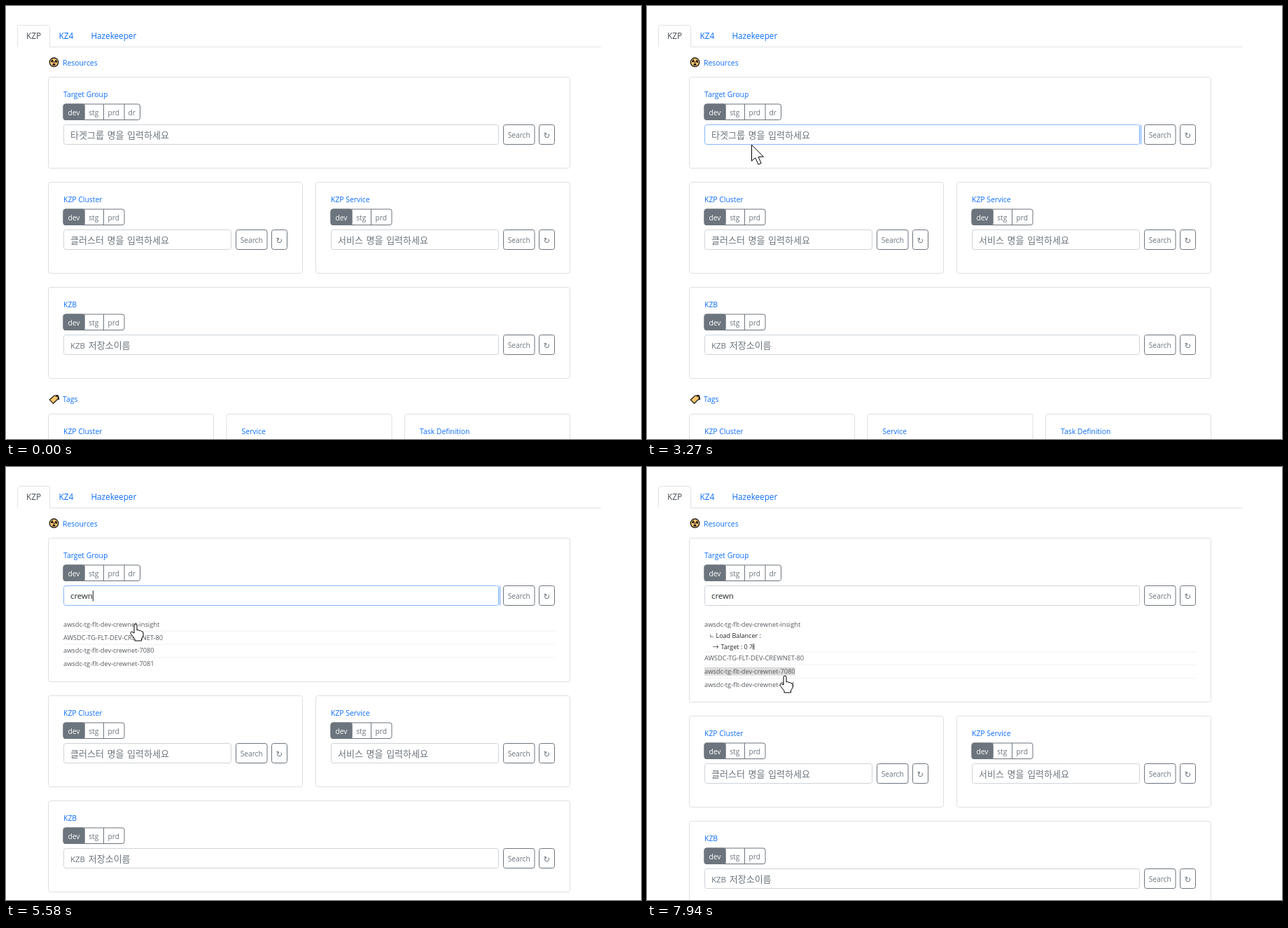
An HTML page for the animation above (8000 ms loop, 907x618 px).

```html
<!DOCTYPE html>
<html lang="ko">
<head>
<meta charset="utf-8">
<title>Resource search</title>
<style>
  html, body { margin: 0; width: 100%; height: 100%; overflow: hidden; background: #fff; }
  svg { display: block; font-family: 'Open Sans', 'Noto Sans CJK KR', 'Noto Sans CJK', sans-serif; }
  text { white-space: pre; }
</style>
</head>
<body>
<svg id="stage" width="907" height="618" viewBox="0 0 907 618"></svg>
<script>
const LOOP = 8000;
const BLUE = '#0d6efd', GRAY = '#6c757d', BORDER = '#dfdfdf', INPUT = '#ced4da';

const text = (x, y, str, size, fill, attrs = '') =>
  `<text x="${x}" y="${y}" font-size="${size}" fill="${fill}" ${attrs}>${str}</text>`;
const box = (x, y, w, h, stroke, attrs = '') =>
  `<rect x="${x}" y="${y}" width="${w}" height="${h}" rx="3" fill="#fff" stroke="${stroke}" ${attrs}/>`;
const title = (x, y, str) => text(x, y, str, 10.4, BLUE);
const centered = (x, y, str, attrs = '', fill = GRAY) =>
  text(x, y, str, 10.2, fill, `text-anchor="middle" ${attrs}`);

function envButtons(x, y, names) {
  const edges = [0, 30, 57.5, 87, 109.5];
  let out = box(x, y, edges[names.length], 22.5, GRAY);
  names.forEach((name, i) => {
    const mid = x + (edges[i] + edges[i + 1]) / 2 - (i ? 0.5 : 0);
    if (i) out += `<path d="M${x + edges[i]} ${y}v22.5" stroke="${GRAY}"/>`;
    else out += box(x, y, 30, 22.5, GRAY, `style="fill:${GRAY}"`);
    out += centered(mid, y + 15.6, name, i ? '' : 'font-weight="500"', i ? GRAY : '#fff');
  });
  return out;
}

function searchCard(x, y, w, name, hint, envs, id = '') {
  const right = x + w, top = y + 68;
  return box(x, y, w, 130, BORDER, `id="card${id}"`) +
    title(x + 21.5, y + 28.3, name) +
    envButtons(x + 21.5, y + 38.5, envs) +
    box(x + 22, top, w - 124, 28, INPUT, `id="field${id}"`) +
    text(x + 31.5, y + 87.2, hint, 13, GRAY, `id="hint${id}" word-spacing="1.3"`) +
    box(right - 95, top, 44.5, 28, GRAY) +
    centered(right - 72.8, y + 86.4, 'Search') +
    box(right - 44, top, 22, 28, GRAY) +
    text(right - 33, y + 87, '↻', 11.5, GRAY,
      `text-anchor="middle" style="font-family:'DejaVu Sans',sans-serif"`);
}

const envs = ['dev', 'stg', 'prd'];
const prefix = 'awsdc-tg-flt-dev-crewnet-';
const rowNames = [prefix + 'insight', (prefix + '80').toUpperCase(), prefix + '7080', prefix + '7081'];
const ROW_H = 18.8, ROW_Y = 224.5, DETAIL_H = 29.5;

const row = (name, i) => {
  const y = ROW_Y + i * ROW_H;
  const line = i ? `<path d="M82 ${y - 9}H784" stroke="#f1f1f1"/>` : '';
  return `<g class="row">${line}<rect x="82" y="${y - 6}" height="12" fill="#dcdcdc"/>` +
    text(82, y + 3.3, name, 9.25, '#565b60') + '</g>';
};

const radiation = `<g transform="translate(68.5 80.3)">
  <circle r="6.3" fill="#fdc66b" stroke="#1c1c1c" stroke-width="1.3"/>
  <circle r="3.2" fill="none" stroke="#1c1c1c" stroke-width="3" stroke-dasharray="3.351" transform="rotate(60)"/>
  <circle r="1" fill="#1c1c1c"/></g>`;
const tag = `<g stroke="#1c1c1c" stroke-linejoin="round" fill="#fdc66b">
  <path d="M62.3 562L69 556L74 555.5L74.5 560.5L67.5 567.3Z" stroke-width="1.2"/>
  <path d="M71 557.5Q75.5 554 75.3 562" fill="none" stroke-width="1.8"/></g>`;

const stage = document.getElementById('stage');
stage.innerHTML = `
  <path d="M16.5 58V30.5a3 3 0 0 1 3-3H59.5a3 3 0 0 1 3 3V58.5H850" fill="none" stroke="#dee2e6"/>
  ${text(29, 47.2, 'KZP', 11.8, '#495057')}
  ${text(75.5, 47.2, 'KZ4', 11.8, BLUE)}
  ${text(121.5, 47.2, 'Hazekeeper', 11.7, BLUE)}
  ${radiation}${title(81, 84.6, 'Resources')}
  ${searchCard(60.5, 101.5, 745, 'Target Group', '타겟그룹 명을 입력하세요', [...envs, 'dr'], 'Main')}
  <rect id="ring" x="704" y="169.5" width="3" height="28" fill="#bcd7fe"/>
  ${text(92, 188.3, '', 11.4, '#212529', 'id="typed"')}
  <rect id="caret" y="176.5" width="1" height="15" fill="#212529"/>
  <g id="results">${rowNames.map(row).join('')}
    <g id="detail">
      ${text(89, 243.7, 'ㄴ', 8, '#212529')}${text(98.5, 243.7, 'Load Balancer :', 9, '#212529')}
      ${text(93.5, 259.5, '→', 9, '#212529')}${text(105.5, 259.5, 'Target : 0 개', 9, '#212529')}
    </g>
  </g>
  <g id="lower">
    ${searchCard(60.5, 251.5, 363, 'KZP Cluster', '클러스터 명을 입력하세요', envs)}
    ${searchCard(442.5, 251.5, 363, 'KZP Service', '서비스 명을 입력하세요', envs)}
    ${searchCard(60.5, 401.5, 745, 'KZB', '<tspan font-size="11.5">KZB</tspan> 저장소이름', envs)}
    ${tag}${title(81, 565.4, 'Tags')}
    ${['KZP Cluster', 'Service', 'Task Definition'].map((name, i) => {
      const x = 60.5 + i * 254.5;
      return box(x, 582.5, 236, 100, BORDER) + title(x + 21.5, 610.5, name);
    }).join('')}
  </g>
  <circle id="glow" r="9.5" fill="#ff0" fill-opacity=".6"/>
  <path id="arrow" d="M0 0V23L5.3 18.4L9.5 28L13.6 26.2L9.5 17.2L17 17Z" fill="#fff" stroke="#000"/>
  <path id="hand" fill="#fff" stroke="#000" stroke-linejoin="round"
    d="M-2 13V2Q-2 0 0 0T2 2V9Q4 7.3 5.3 9.7Q7.4 8.4 8.4 10.7Q11 10 11 13V17L8.5 21V24H-1V21.5L-6.3 14.8Q-8 11.5-5.4 11Z"/>`;

const el = {};
stage.querySelectorAll('[id]').forEach(node => el[node.id] = node);
const rows = [...stage.querySelectorAll('.row')];
const show = (node, on) => node.style.display = on ? '' : 'none';
const clamp01 = v => Math.min(1, Math.max(0, v));
const within = (t, a, b) => t >= a && t < b;

// Pointer path: time, x, y
const path = [
  [860, 836, 562], [1630, 142, 166], [1700, 142, 168], [2000, 136, 174], [2180, 141, 187],
  [3120, 141, 187], [3410, 157, 208], [3610, 157, 208], [3750, 158, 211.5], [4810, 158, 211.5],
  [5580, 185, 224], [5850, 186, 224], [6200, 192, 243], [6550, 190, 222.5], [6690, 190, 222.5],
  [6830, 192, 229], [7180, 192, 225], [7380, 192, 225], [7940, 197, 298], [LOOP, 197, 298]
];
function pointerAt(t) {
  const i = Math.max(1, path.findIndex(key => key[0] > t));
  const [t0, x0, y0] = path[i - 1], [t1, x1, y1] = path[i];
  const u = clamp01((t - t0) / (t1 - t0)), k = u * u * (3 - 2 * u);
  return [x0 + (x1 - x0) * k, y0 + (y1 - y0) * k];
}

const FOCUS = 2520, BLUR = 6900, RESULTS = 5100, HOVER = 5650, EXPAND = 7450;
const keyTimes = [3340, 3680, 3950, 4080, 4210];

function drawField(t) {
  const count = keyTimes.filter(k => k <= t).length;
  const focus = clamp01((t - FOCUS) / 150) - clamp01((t - BLUR) / 150);
  const mix = (a, b) => Math.round(a + (b - a) * focus);
  el.fieldMain.setAttribute('stroke', `rgb(${mix(206, 134)},${mix(212, 183)},${mix(218, 254)})`);
  el.ring.setAttribute('opacity', focus);
  show(el.hintMain, !count);
  el.typed.textContent = 'crewn'.slice(0, count);
  el.caret.setAttribute('x', 92 + (count ? el.typed.getComputedTextLength() : 0));
  const last = count ? keyTimes[count - 1] : FOCUS;
  const blinkOn = t - last < 600 || (t - last - 100) % 1000 < 500;
  show(el.caret, within(t, FOCUS, BLUR) && blinkOn);
}

function drawResults(t, pointerY) {
  const found = t >= RESULTS, expanded = t >= EXPAND;
  const shift = expanded ? 104 : found ? 75 : 0;
  el.cardMain.setAttribute('height', 130 + shift);
  el.lower.setAttribute('transform', `translate(0 ${shift})`);
  show(el.results, found);
  show(el.detail, expanded);
  rows.forEach((node, i) => {
    const dy = expanded && i ? DETAIL_H : 0;
    const hovered = t >= HOVER && Math.abs(pointerY - ROW_Y - i * ROW_H - dy) < 6.8;
    node.setAttribute('transform', `translate(0 ${dy})`);
    const [mark, label] = [node.querySelector('rect'), node.querySelector('text')];
    mark.setAttribute('width', hovered ? label.getComputedTextLength() : 0);
  });
}

function draw(t) {
  const [x, y] = pointerAt(t);
  drawField(t);
  drawResults(t, y);
  const hand = t >= RESULTS + 200;
  for (const node of [el.glow, el.arrow, el.hand]) node.setAttribute('transform', `translate(${x} ${y})`);
  show(el.glow, within(t, 2380, 2520) || within(t, 6830, 6970));
  show(el.arrow, t >= 860 && !hand);
  show(el.hand, hand);
}

const start = performance.now();
function tick() {
  draw((performance.now() - start) % LOOP);
  requestAnimationFrame(tick);
}
tick();
</script>
</body>
</html>
```
